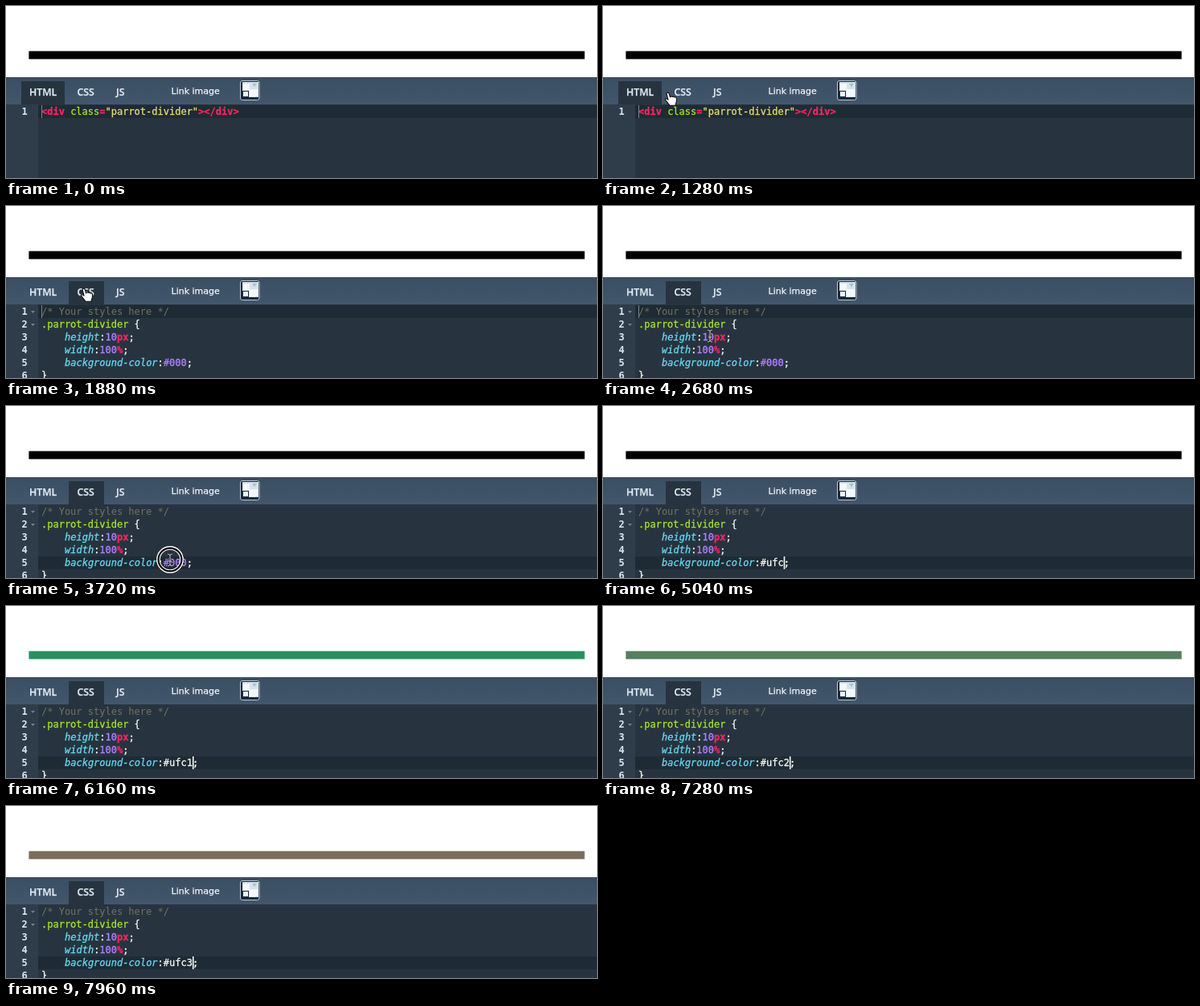
These frames come from a looping animation (735x215 px, 8000 ms). An HTML page:

```html
<!DOCTYPE html>
<html lang="en">
<head>
<meta charset="utf-8">
<title>Divider editor</title>
<style>
html, body { margin: 0; width: 100%; height: 100%; overflow: hidden; background: #fff; }
svg { display: block; width: 735px; height: 215px; }
text { white-space: pre; }
.tabs text { font: 600 12.3px "Open Sans", sans-serif; fill: #e3edf6; stroke: #e3edf6; stroke-width: .25px; }
.tabs .link { font: 11px "DejaVu Sans", sans-serif; fill: #f2f6fa; stroke: #f2f6fa; }
.code text { font: 12px "DejaVu Sans Mono", monospace; fill: #f8f8f2; stroke: #f8f8f2; stroke-width: .3px; }
.code .num { font-weight: bold; fill: #dce6ee; stroke: none; }
.code .tag { font-weight: bold; fill: #f5265f; stroke: #f5265f; }
.code .name { fill: #a6e22e; stroke: #a6e22e; }
.code .string { fill: #e6db74; stroke: #e6db74; }
.code .prop { fill: #66d9ef; stroke: #66d9ef; font-style: italic; }
.code .value { fill: #ae81ff; stroke: #ae81ff; }
.code .note { fill: #75715e; stroke: none; }
</style>
</head>
<body>
<svg viewBox="0 0 735 215">
  <defs>
    <linearGradient id="shade" x2="0" y2="1">
      <stop stop-color="#3b4f63"/><stop offset="1" stop-color="#42566c"/>
    </linearGradient>
    <path id="ibeam" d="M-3-7q3 0 3 2 0-2 3-2M0-5V6M-3 8q3 0 3-2 0 2 3 2M-2 2h4"/>
  </defs>
  <rect id="bar" x="28.4" y="56.4" width="691.2" height="10"/>
  <rect y="89" width="735" height="126" fill="#273440"/>
  <rect y="123" width="40" height="92" fill="#2f3d4b"/>
  <rect id="active" x="40" width="695" height="16" fill="#1e2b34"/>
  <g class="tabs">
    <rect y="89" width="735" height="34" fill="url(#shade)"/>
    <path d="M0 89.5H735" stroke="#34475a"/>
    <rect id="tab" y="94" height="29" fill="#273440"/>
    <text x="29" y="112">HTML</text>
    <text x="88.5" y="112">CSS</text>
    <text x="137" y="112">JS</text>
    <text class="link" x="205.5" y="109.5">Link image</text>
    <rect x="291.5" y="93.5" width="23.5" height="24" rx="2.5" fill="#19283a" stroke="#b9c9d6"/>
    <path d="M294 95h20v19h-12v-8h-8z" fill="#d5e3eb"/>
    <path d="M295 97h8v8h-8zM303 104h10v9h-10zM295 107h6v6h-6z" fill="#f4f8fb"/>
    <path d="M306 97h6l-3 4z" fill="#a9bfcd"/>
  </g>
  <g class="code">
    <g id="html">
      <text class="num" x="19.5" y="136">1</text>
      <text x="44" y="136"><tspan class="tag">&lt;div</tspan> <tspan class="name">class</tspan><tspan class="tag">=</tspan><tspan class="string">"parrot-divider"</tspan><tspan class="tag">&gt;&lt;/div&gt;</tspan></text>
    </g>
    <g id="css">
      <g id="gutter"></g>
      <path d="M31 131h5l-2.5 3zM31 147h5l-2.5 3z" fill="#71808d"/>
      <text class="note" x="44" y="136">/* Your styles here */</text>
      <text x="44" y="152"><tspan class="name">.parrot-divider</tspan> {</text>
      <text x="73" y="168"><tspan class="prop">height</tspan>:<tspan class="value">10</tspan><tspan class="tag">px</tspan>;</text>
      <text x="73" y="184"><tspan class="prop">width</tspan>:<tspan class="value">100</tspan><tspan class="tag">%</tspan>;</text>
      <rect id="selection" x="203" y="188" width="22" height="16" fill="#4b5360"/>
      <text x="73" y="200"><tspan class="prop">background-color</tspan>:<tspan id="color"></tspan>;</text>
      <text x="44" y="216">}</text>
    </g>
  </g>
  <rect id="caret" height="16"/>
  <g id="pointer">
    <g id="ring" fill="none">
      <circle r="14.7" stroke="#000" stroke-width="4"/>
      <circle r="16.2" stroke="#fff" stroke-width="1.4"/>
      <circle r="12.8" stroke="#fff" stroke-width="1.1"/>
    </g>
    <path id="hand" d="M-2 -6q1.5-1.5 3 0l1.5 5 1-1.2 2 .8 1-.6 1.6 1 1.3-.3 1 1.5v4l-1.5 5h-7l-3.5-4.5-2.2-3q.6-2 2.8-.3l1 .8z" fill="#fff" stroke="#111" stroke-width="1.1" stroke-linejoin="round"/>
    <g id="beam" fill="none">
      <use href="#ibeam" stroke="#222" stroke-width="2.4"/>
      <use href="#ibeam" stroke="#ccc"/>
    </g>
  </g>
</svg>
<script>
const $ = id => document.getElementById(id);
const set = (id, attrs) => {
  for (const key in attrs) $(id).setAttribute(key, attrs[key]);
};
const show = (id, on) => set(id, { visibility: on ? 'inherit' : 'hidden' });

const LOOP = 8000, TAB_SWITCH = 1560, FOCUS = 3680, SELECT = 3840, TYPE = 4680;
const typed = [[0, '#000'], [TYPE, '#u'], [4840, '#uf'], [5000, '#ufc'], [5920, '#ufc1'],
  [6560, '#ufc'], [6760, '#ufc2'], [7320, '#ufc'], [7560, '#ufc3']];
const barColors = [[0, '#000'], [6160, '#27905f'], [7040, '#567f5e'], [7840, '#7c6c5c']];
// Pointer stops: time, x, y
const path = [[1200, 66, 82], [1280, 81, 115], [1440, 97, 110], [2040, 97, 110],
  [2680, 133, 162], [2880, 140, 168], [3480, 204, 192], [4080, 204, 192], [4520, 336, 200]];

const at = (steps, t) => steps.filter(s => s[0] <= t).pop()[1];

function pointerAt(t) {
  const i = Math.max(1, path.findIndex(p => p[0] >= t));
  const [t0, x0, y0] = path[i - 1], [t1, x1, y1] = path[i];
  const k = (t - t0) / (t1 - t0), e = k * k * (3 - 2 * k);
  return [x0 + (x1 - x0) * e, y0 + (y1 - y0) * e];
}

for (let n = 1; n <= 6; n++) {
  $('gutter').innerHTML += `<text class="num" x="19.5" y="${120 + 16 * n}">${n}</text>`;
}

function draw(t) {
  const css = t >= TAB_SWITCH, editing = t >= FOCUS, typing = t >= TYPE;
  const value = at(typed, t);
  set('bar', { fill: at(barColors, t) });
  set('tab', css ? { x: 78, width: 44 } : { x: 19, width: 54 });
  show('html', !css);
  show('css', css);
  set('active', { y: editing ? 188 : 124 });
  show('selection', t >= SELECT && !typing);
  $('color').textContent = value;
  set('color', { class: typing ? '' : 'value' });

  show('caret', !editing || typing);
  set('caret', typing
    ? { x: 195.8 + value.length * 7.224, y: 188, width: 1.6, fill: '#f8f8f0' }
    : { x: 44, y: 124, width: 1, fill: '#78838a' });

  const moving = t >= 1200 && t <= 4520;
  show('pointer', moving);
  if (!moving) return;
  const [x, y] = pointerAt(t);
  set('pointer', { transform: `translate(${x} ${y})` });
  show('hand', y < 123);
  show('beam', y >= 123);
  show('ring', t >= 1480 && t < 1680 || t >= 3560 && t < 3840);
}

function tick() {
  draw(performance.now() % LOOP);
  requestAnimationFrame(tick);
}
tick();
</script>
</body>
</html>
```
